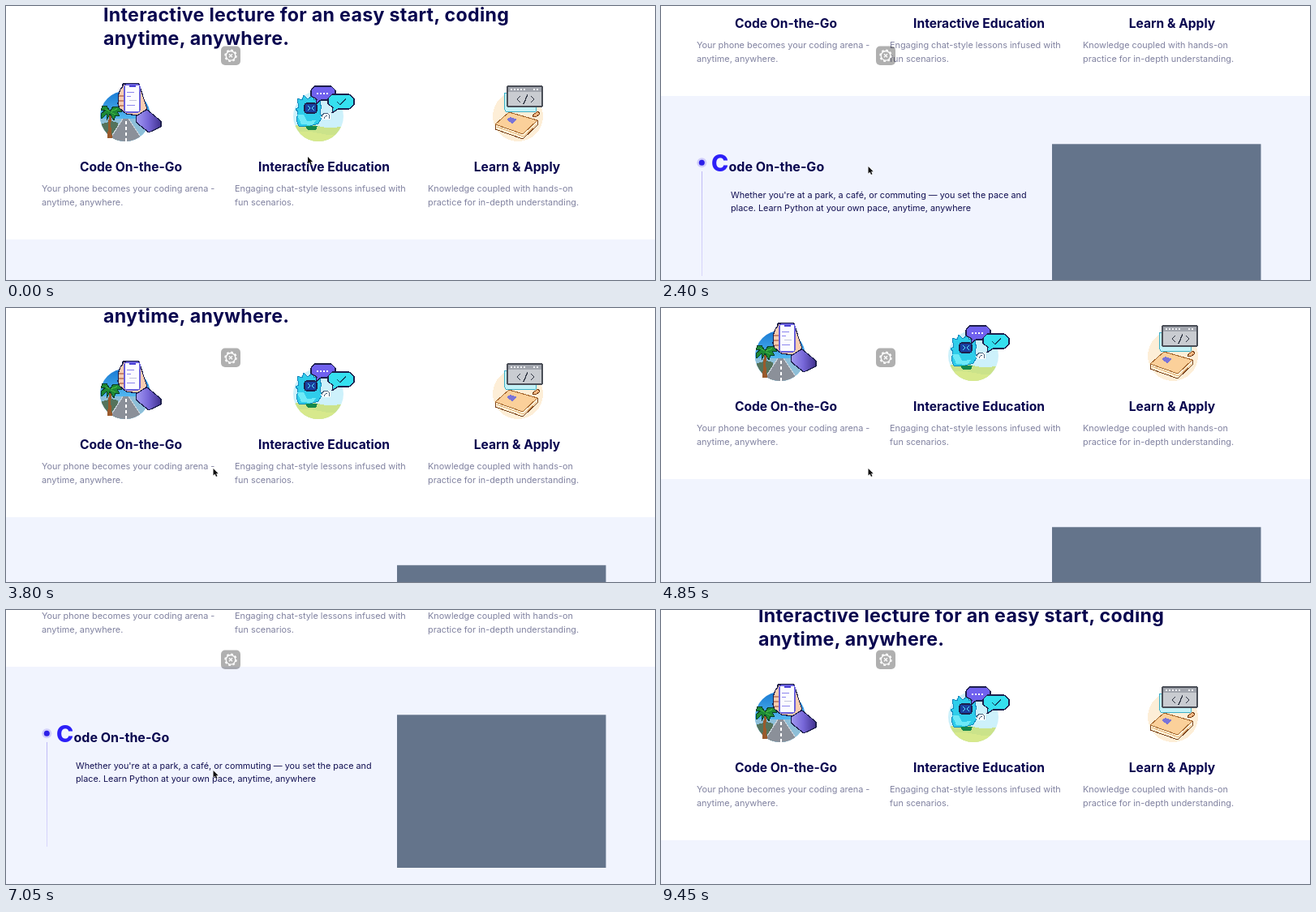
Animation, 800 px wide and 338 px high, one loop 9500 ms. Source, as an HTML page:

```html
<!DOCTYPE html>
<html lang="en">
<head>
<meta charset="utf-8">
<title>Interactive lecture</title>
<style>
  html, body { margin: 0; width: 100%; height: 100%; overflow: hidden; background: #fff; }
  svg { display: block; width: 800px; height: 338px; }
  text { font-family: Inter, "Open Sans", sans-serif; fill: #09064f; white-space: pre; }
  .headline { font-size: 23.2px; font-weight: 700; letter-spacing: .3px; }
  .title { font-size: 15.6px; font-weight: 700; text-anchor: middle; }
  .note { font-size: 10.87px; fill: #8082a0; }
  .body { font-size: 10.8px; fill: #121052; }
  .topic { font-size: 16px; font-weight: 700; }
  .initial { font-size: 28.5px; font-weight: 800; fill: #2c1ff8; }
  .icon { shape-rendering: crispEdges; stroke-linejoin: bevel; }
  .ink { stroke: #1d1f4c; stroke-width: 1.2; }
  .line { fill: none; stroke-width: 1.3; }
</style>
</head>
<body>
<svg viewBox="0 0 800 338">
  <defs>
    <clipPath id="scene1"><circle cx="147" cy="136" r="31"/></clipPath>
    <clipPath id="scene2"><circle cx="385" cy="136" r="31"/></clipPath>
    <linearGradient id="sky" x2="0" y2="1">
      <stop stop-color="#1677d2"/><stop offset=".6" stop-color="#58bdf3"/>
    </linearGradient>
    <linearGradient id="sleeve">
      <stop stop-color="#a49cf3"/><stop offset=".5" stop-color="#7767d8"/><stop offset="1" stop-color="#41328f"/>
    </linearGradient>
    <linearGradient id="fade" x2="0" y2="1">
      <stop stop-color="#bdb8f6"/><stop offset="1" stop-color="#d9d7fb"/>
    </linearGradient>
  </defs>

  <g id="page">
    <rect y="288" width="800" height="400" fill="#f1f4fe"/>
    <text class="headline" x="120" y="19">Interactive lecture for an easy start, coding</text>
    <text class="headline" x="120" y="48">anytime, anywhere.</text>

    <g class="icon">
      <g clip-path="url(#scene1)">
        <rect x="115" y="104" width="64" height="64" fill="url(#sky)"/>
        <path d="M116 139h62v30h-62z" fill="#8dbfd8"/>
        <path d="M116 146l14-4 8 2v24h-22z" fill="#54735c"/>
        <path d="M144 139h7l21 30h-48z" fill="#8b9099"/>
        <path d="M147.500 142v26" stroke="#fff" stroke-width="2" stroke-dasharray="4 3"/>
        <path d="M144 139l-19 30M151 139l20 30" stroke="#c9d2da" class="line"/>
      </g>
      <path d="M127 132l4 2-2 12 2 17h-6l1-15z" fill="#9a5a2c"/>
      <path d="M128 130l-4-7h-5l-2 6 6-1-6 5 1 6 6-6v8l4-8 5 8 2-6 5 1-3-6h6l-4-6h-7z" fill="#1d8a35" stroke="#0d3f2b"/>
      <path d="M128 130l-6-3M129 130l8-3M129 131l6 3" stroke="#45b541" class="line"/>
      <path class="ink" d="M160 134l14-6 17 14v7l-15 7-15-12z" fill="url(#sleeve)"/>
      <path class="ink" d="M141 103l3-4v-3h20l5 16 5 15-12 8-14-2-8-7-2-5 1-13z" fill="#fbcdb0"/>
      <path d="M139 111h7M139 117h7M140 123h6" stroke="#c9866c" class="line"/>
      <rect x="146" y="97" width="19" height="34" rx="3" fill="#fbfbff" stroke="#6a61dc" stroke-width="1.300"/>
      <path d="M152 98.500h8" stroke="#4d43d8" stroke-width="2"/>
      <path d="M149 106.500h9M149 111.500h5M149 122.500h10" stroke="#8c85ee" stroke-width="1"/>
      <path d="M152 116.500h9" stroke="#c2c4dc" stroke-width="1"/>
    </g>

    <g class="icon">
      <g clip-path="url(#scene2)">
        <rect x="354" y="104" width="64" height="64" fill="#cdf1fb"/>
        <path d="M354 148q15-4 30 0t34 0v20h-64z" fill="#cbe38a"/>
        <path d="M354 157q16-4 32 0t32 0v11h-64z" fill="#d7e98c"/>
      </g>
      <path d="M358 141l2-10-3-4 4-2-2-11 6 2 2-6 5 5 6-5 2 6 7-2v7l2 3-2 6 2 8-4 7-10 3h-14z" fill="#2fcdea" stroke="#1187bd"/>
      <path d="M359 134h8l4 8 11-1-4 6-14-1z" fill="#6ee9f7"/>
      <rect class="ink" x="368" y="120" width="15" height="12" rx="3" fill="#1a3fa0"/>
      <path d="M372 123l3 3-3 3M380 123l-3 3 3 3" stroke="#58e7fb" class="line"/>
      <path d="M369 148h15l-2 5h-10z" fill="#14884c"/>
      <path d="M388 138q1-6 7-6h5v8h-10z" fill="#fff"/>
      <path d="M389 137q1-5 6-5 4 1 4 7M392 139q1-4 4-3" stroke="#46617b" stroke-width="1" fill="none"/>
      <path class="ink" d="M380 99h21l5 5v7l-5 5h-13l-6 5 1-6-7-4v-7z" fill="#7061ee"/>
      <path d="M383 108h14" stroke="#fff" stroke-width="2" stroke-dasharray="2"/>
      <path class="ink" d="M402 109h21l6 5v8l-6 5h-14l-7 5 1-7-6-4v-7z" fill="#35e0ef"/>
      <path d="M408 118l4 4 7-8" stroke="#16435f" class="line"/>
    </g>

    <g class="icon">
      <circle cx="631" cy="136" r="31" fill="#fdeed7"/>
      <path d="M615 107h9v17h29v6h-37l-2-4z" fill="#c3f1f6" stroke="#3fb0c8"/>
      <rect x="618" y="99" width="43" height="25" fill="#c9ccd1" stroke="#4a4e57" stroke-width="1.200"/>
      <path d="M619 103h41" stroke="#a2a6ae" stroke-width="6"/>
      <path d="M622 103h20M650 103h8" stroke="#f0f1f4" stroke-width="2" stroke-dasharray="2"/>
      <path d="M634 111l-4 4 4 4M643 109l-5 12M647 111l4 4-4 4" stroke="#2d3340" class="line"/>
      <path d="M603 146l17-15 35 10v6l-18 17-34-12z" fill="#fff2d7" stroke="#7a421b"/>
      <path d="M603 146l17-15 35 10-18 17z" fill="#fbd09a" stroke="#a5672f"/>
      <path d="M605 149l33 12 16-15" stroke="#e3b47c" stroke-width="1" fill="none"/>
      <path d="M617 140l5-3 8 3-6 5z" fill="#7a74d8"/>
      <path d="M649 136l2-3 5-3 2 3-5 4z" fill="#f4b983" stroke="#7a421b"/>
    </g>

    <text class="title" x="154" y="204">Code On-the-Go</text>
    <text class="title" x="392" y="204">Interactive Education</text>
    <text class="title" x="630" y="204">Learn &amp; Apply</text>
    <text class="note" x="44" y="229">Your phone becomes your coding arena -</text>
    <text class="note" x="44" y="245.500">anytime, anywhere.</text>
    <text class="note" x="282" y="229">Engaging chat-style lessons infused with</text>
    <text class="note" x="282" y="245.500">fun scenarios.</text>
    <text class="note" x="520" y="229">Knowledge coupled with hands-on</text>
    <text class="note" x="520" y="245.500">practice for in-depth understanding.</text>

    <rect x="482" y="347.300" width="257.500" height="188.700" fill="#64748b"/>
    <rect id="rail" x="50" y="381" width="1" height="129" fill="url(#fade)"/>
    <g id="dot">
      <circle cx="50.300" cy="370.300" r="6" fill="#d0cdfb"/>
      <circle cx="50.300" cy="370.300" r="3.500" fill="#2c1fe8"/>
    </g>
    <g id="topic">
      <text class="initial" x="62" y="381">C</text>
      <text class="topic" x="83.500" y="381">ode On-the-Go</text>
    </g>
    <g id="copy">
      <text class="body" x="86" y="413.500">Whether you're at a park, a café, or commuting — you set the pace and</text>
      <text class="body" x="86" y="430">place. Learn Python at your own pace, anytime, anywhere</text>
    </g>
  </g>

  <g id="badge">
    <rect x="265" y="49.500" width="24" height="23.500" rx="5" fill="#000" fill-opacity=".31"/>
    <g fill="none" stroke="#fff" stroke-width="1.300">
      <circle cx="277" cy="61.300" r="5.800"/>
      <circle cx="277" cy="61.300" r="7" stroke-dasharray="2.750" stroke-width="1.500"/>
      <path d="M275 59.300l4 4M279 59.300l-1.500 1.500M275 63.300l1.500-1.500"/>
    </g>
  </g>
  <path id="cursor" d="M0 0v8.500l2-1.800 1.500 3.300 1.500-.7-1.500-3.100h2.700z" fill="#111" stroke="#fff" stroke-width=".8" paint-order="stroke"/>
</svg>

<script>
const LOOP = 9500, STEP = 50;

// [time, scroll offset]
const scrollKeys = [
  [0, 0], [250, 0], [1300, 150], [2000, 190], [2100, 190], [2400, 177],
  [3800, 30], [4050, 24], [4200, 24], [5800, 193], [6500, 218],
  [7050, 218], [8200, 42], [9200, 4], [9500, 4]
];
// [appear, disappear] for the topic heading
const visits = [[1150, 3250], [5530, 8070]];

const $ = id => document.getElementById(id);
const clamp = x => Math.max(0, Math.min(1, x));
const ramp = (t, start, length) => clamp((t - start) / length);
const ease = x => x * x * (3 - 2 * x);

// Monotone cubic through the keys, flat at turning points
const slope = i => (scrollKeys[i + 1][1] - scrollKeys[i][1]) / (scrollKeys[i + 1][0] - scrollKeys[i][0]);
const tangent = i => {
  if (i === 0 || i === scrollKeys.length - 1) return 0;
  const a = slope(i - 1), b = slope(i);
  return a * b <= 0 ? 0 : 2 * a * b / (a + b);
};
function scrollAt(t) {
  let i = 0;
  while (i < scrollKeys.length - 2 && t >= scrollKeys[i + 1][0]) i++;
  const [t0, y0] = scrollKeys[i], [t1, y1] = scrollKeys[i + 1];
  const h = t1 - t0, u = (t - t0) / h, v = 1 - u;
  return y0 * v * v * (1 + 2 * u) + y1 * u * u * (3 - 2 * u)
    + h * u * v * (v * tangent(i) - u * tangent(i + 1));
}

const shown = (t, delay) => Math.max(...visits.map(([enter, leave]) =>
  ease(ramp(t, enter + delay, 450)) * (1 - ease(ramp(t, leave, 400)))));

function draw(t) {
  $('page').setAttribute('transform', `translate(0 ${-Math.round(scrollAt(t))})`);

  const topic = shown(t, 0), copy = shown(t, 380);
  $('topic').setAttribute('opacity', topic);
  $('topic').setAttribute('transform', `translate(${-7 * (1 - topic)} 0)`);
  $('dot').setAttribute('opacity', topic);
  $('copy').setAttribute('opacity', copy);
  $('rail').setAttribute('height', 129 * copy);

  const move = ease(ramp(t, 250, 800));
  $('cursor').setAttribute('transform', `translate(${372 - 116.500 * move} ${186 + 12 * move})`);
  $('cursor').setAttribute('visibility', t < 9200 ? 'visible' : 'hidden');
}

function tick() {
  draw(Math.floor(performance.now() % LOOP / STEP) * STEP);
  requestAnimationFrame(tick);
}
tick();
</script>
</body>
</html>
```
